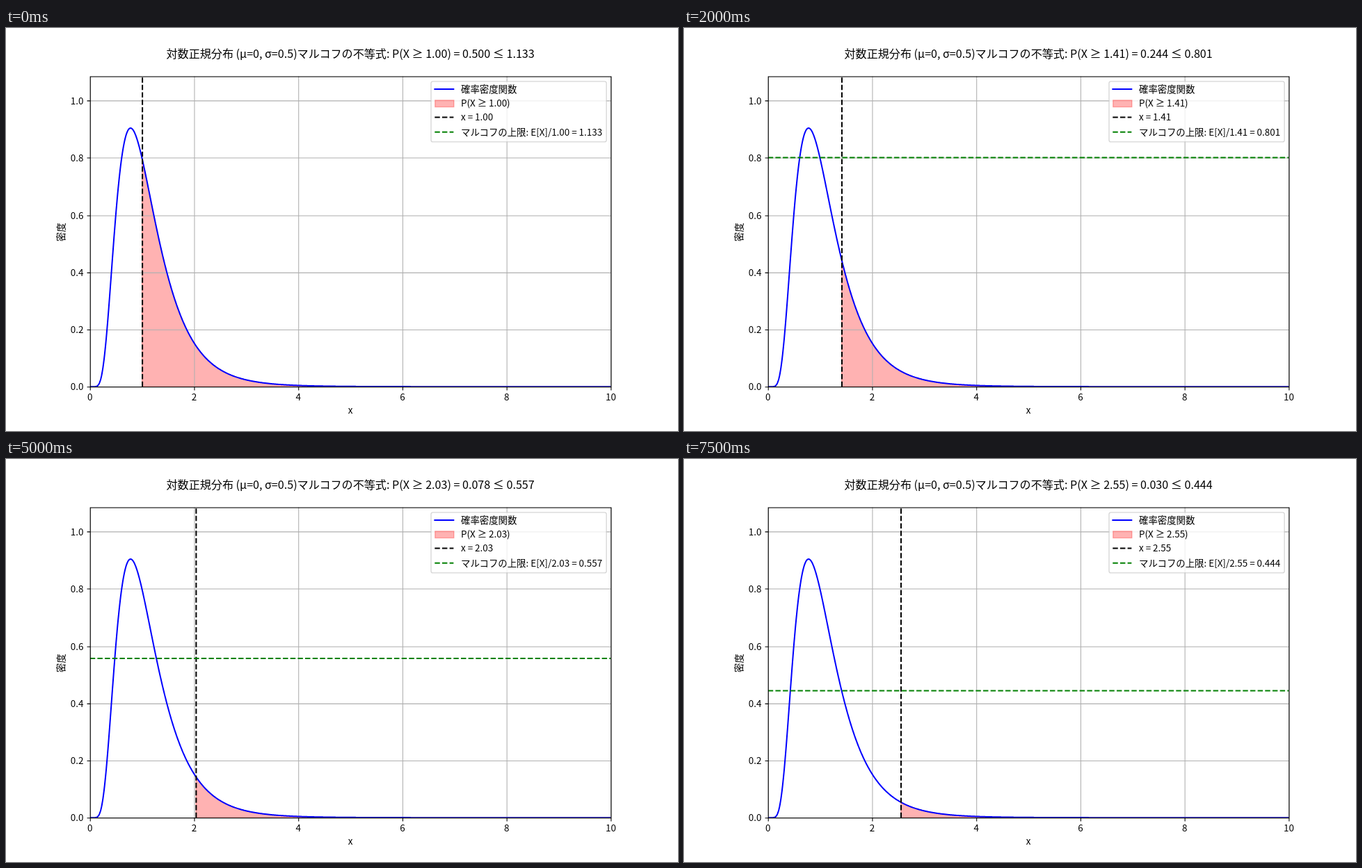
These frames come from a looping animation (966x580 px, 8000 ms). An HTML page:

```html
<!DOCTYPE html>
<html lang="ja">
<head>
<meta charset="utf-8">
<style>
  html, body { margin: 0; width: 966px; height: 580px; overflow: hidden; background: #fff; }
  svg { display: block; }
  text { font: 13.89px "Noto Sans CJK JP", "Noto Sans CJK", sans-serif; white-space: pre; }
  #title { font-size: 16.67px; }
  .thin { fill: none; stroke: #000; stroke-width: 1.11; }
  .grid { stroke: #b0b0b0; }
  .line { fill: none; stroke-width: 2.083; stroke-linejoin: round; }
  .dash { stroke-dasharray: 7.71 3.33; }
  .blue { stroke: #00f; }
  .black { stroke: #000; }
  .green { stroke: #008000; }
  .tail { fill: #f00; stroke: #f00; stroke-width: 1.39; fill-opacity: .3; stroke-opacity: .3; }
  .mid { text-anchor: middle; }
  .end { text-anchor: end; }
</style>
</head>
<body>
<!-- A 10 by 6 inch figure at 100 dpi, scaled to the stage -->
<svg width="966" height="580" viewBox="0 0 1000 600" preserveAspectRatio="none">
  <clipPath id="plot"><rect x="125" y="72" width="775" height="462"/></clipPath>
  <g clip-path="url(#plot)"><path id="area" class="tail"/></g>
  <path id="grid" class="thin grid"/>
  <path id="ticks" class="thin"/>
  <g clip-path="url(#plot)">
    <path id="curve" class="line blue"/>
    <path id="limit" class="line dash black"/>
    <path id="bound" class="line dash green"/>
  </g>
  <rect class="thin" x="125.5" y="72.5" width="775" height="462"/>
  <g id="labels"></g>
  <text class="mid" x="512.5" y="574">x</text>
  <text class="mid" transform="translate(87 304) rotate(-90)">密度</text>
  <text id="title" class="mid" x="512.5" y="44"></text>
  <g id="legend">
    <rect x="632.5" y="79.5" width="261" height="90" rx="2.8" fill="#fff" stroke="#ccc" stroke-width="1.39" opacity=".8"/>
    <path class="line blue" d="M637 91h30"/>
    <rect class="tail" x="638.5" y="107.5" width="28" height="10"/>
    <path class="line dash black" d="M638 133h28"/>
    <path class="line dash green" d="M638 155h28"/>
    <text x="677" y="96">確率密度関数</text>
    <text id="tailKey" x="677" y="117"></text>
    <text id="limitKey" x="677" y="138"></text>
    <text id="boundKey" x="677" y="160"></text>
  </g>
</svg>
<script>
const $ = id => document.getElementById(id);
const SIGMA = 0.5, MEAN = Math.exp(SIGMA ** 2 / 2);
const LEFT = 125, RIGHT = 900, TOP = 72, BOTTOM = 534;
const STEP_MS = 500, STEPS = 16;

const pdf = x => x <= 0 ? 0 :
  Math.exp(-((Math.log(x) / SIGMA) ** 2) / 2) / (x * SIGMA * Math.sqrt(2 * Math.PI));

const Y_MAX = 1.2 * pdf(Math.exp(-(SIGMA ** 2)));
const px = x => LEFT + x / 10 * (RIGHT - LEFT);
const py = y => BOTTOM - y / Y_MAX * (BOTTOM - TOP);

// The median is 1, so half the mass lies above it.
function tailMass(a) {
  const n = 400, h = (a - 1) / n;
  let sum = 0;
  for (let i = 0; i < n; i++) sum += pdf(1 + (i + 0.5) * h);
  return 0.5 - sum * h;
}

function curveFrom(a) {
  const pts = [];
  for (let i = 0; i <= 1000; i++) {
    const x = a + (10 - a) * i / 1000;
    pts.push(px(x).toFixed(2) + ' ' + py(pdf(x)).toFixed(2));
  }
  return 'M' + pts.join('L');
}

function drawAxes() {
  let grid = '', ticks = '', labels = '';
  for (let i = 0; i <= 5; i++) {
    const x = Math.round(px(2 * i)) + 0.5, y = Math.round(py(i / 5)) + 0.5;
    grid += `M${x} ${TOP}V${BOTTOM}M${LEFT} ${y}H${RIGHT}`;
    ticks += `M${x} 534.5v4.86M125.5 ${y}h-4.86`;
    labels += `<text class="mid" x="${px(2 * i)}" y="555">${2 * i}</text>` +
      `<text class="end" x="115.3" y="${Math.round(py(i / 5) + 5.4)}">${(i / 5).toFixed(1)}</text>`;
  }
  $('grid').setAttribute('d', grid);
  $('ticks').setAttribute('d', ticks);
  $('labels').innerHTML = labels;
  $('curve').setAttribute('d', curveFrom(0));
}

function drawStep(k) {
  const a = 1 + k * 3 / 29, bound = MEAN / a, y = py(bound);
  const at = a.toFixed(2), boundText = bound.toFixed(3);
  $('area').setAttribute('d', `${curveFrom(a)}V${BOTTOM}H${px(a)}Z`);
  $('limit').setAttribute('d', `M${Math.round(px(a))} ${BOTTOM}V${TOP}`);
  $('bound').setAttribute('d', `M${LEFT} ${Math.round(y)}H${RIGHT}`);
  $('title').textContent =
    `対数正規分布 (μ=0, σ=0.5)マルコフの不等式: P(X ≥ ${at}) = ${tailMass(a).toFixed(3)} ≤ ${boundText}`;
  $('tailKey').textContent = `P(X ≥ ${at})`;
  $('limitKey').textContent = `x = ${at}`;
  $('boundKey').textContent = `マルコフの上限: E[X]/${at} = ${boundText}`;
  // The legend moves down while the bound would cross it.
  const blocked = y > 79 && y < 170;
  $('legend').setAttribute('transform', `translate(0 ${blocked ? 358 : 0})`);
}

let shown = -1;
function tick(now) {
  const k = Math.floor(now / STEP_MS) % STEPS;
  if (k !== shown) drawStep(shown = k);
  requestAnimationFrame(t => tick(Math.max(0, t - start)));
}

drawAxes();
const start = performance.now();
tick(0);
</script>
</body>
</html>
```
